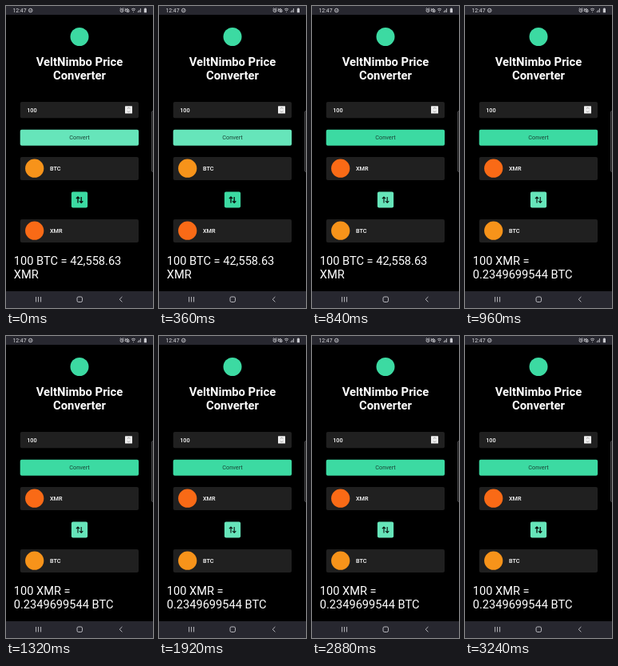
An HTML page that plays this animation: 184 px wide and 378 px high, repeating every 3480 ms.

```html
<!DOCTYPE html>
<html lang="en">
<head>
<meta charset="utf-8">
<title>Price Converter</title>
<style>
  html, body { margin: 0; width: 100%; height: 100%; overflow: hidden; background: #000; }
  svg { display: block; width: 184px; height: 378px; font-family: Roboto, "Open Sans", sans-serif; }
  text { fill: #fff; }
  .bar { fill: #27272f; }
  .field { fill: #202020; }
  .title { font-size: 14.8px; font-weight: 700; text-anchor: middle; }
  .result { font-size: 14.6px; }
  .small { font-size: 7.3px; }
  .coin { font-size: 7.3px; font-weight: 500; }
  .line { fill: none; stroke: #c9c9ce; stroke-width: .9; }
  .btc { fill: #f7931a; }
  .xmr { fill: #f96a16; }

  .before, .after, .old, .new, .convert, .swap, .arrows {
    animation: 3480ms step-end infinite;
  }
  .before { animation-name: swap-out; }
  .after { animation-name: swap-in; }
  .old { animation-name: result-out; }
  .new { animation-name: result-in; }
  .convert { animation-name: release; }
  .swap { animation-name: press; }
  .arrows { animation-name: arrows; fill: none; stroke: #08130f; }

  @keyframes swap-out { 0% { opacity: 1; } 17.24%, 100% { opacity: 0; } }
  @keyframes swap-in { 0% { opacity: 0; } 17.24%, 100% { opacity: 1; } }
  @keyframes result-out { 0% { opacity: 1; } 27.58%, 100% { opacity: 0; } }
  @keyframes result-in { 0% { opacity: 0; } 27.58%, 100% { opacity: 1; } }
  @keyframes release { 0% { fill: #66e5ba; } 17.24%, 100% { fill: #3cdaa2; } }
  @keyframes press { 0% { fill: #3cdaa2; } 17.24%, 100% { fill: #66e5ba; } }
  @keyframes arrows {
    0% { stroke-width: 1.35; }
    17.24% { stroke-width: 1.1; }
    93.1%, 100% { stroke-width: 1.35; }
  }
</style>
</head>
<body>
<svg viewBox="0 0 184 378">
  <defs>
    <g id="btc"><circle class="btc" cx="35.7" cy="14.2" r="11.6"/><text class="coin" x="55" y="17">BTC</text></g>
    <g id="xmr"><circle class="xmr" cx="35.7" cy="14.2" r="11.6"/><text class="coin" x="55" y="17">XMR</text></g>
  </defs>
  <rect width="184" height="378"/>

  <!-- status bar -->
  <rect class="bar" width="184" height="11"/>
  <text x="8.4" y="8" font-size="6.9" style="fill:#d8d8dc">12:47</text>
  <g class="line" style="stroke-width:.9">
    <circle cx="30.7" cy="5.5" r="2.3"/>
    <path d="M29.6 5.4l.9.9 1.6-1.8"/>
    <circle cx="145" cy="5.6" r="2"/>
    <path d="M142.6 3.5l1.2-1M147.4 3.5l-1.2-1M145 4.4v1.3h1M149.3 4.5h1.2l1.6-1.5v5l-1.6-1.5h-1.2zM149 2.8l5 5.2M153.3 4l1 3"/>
    <path d="M157 4.2q2.5-2 5 0M158 5.7q1.5-1.2 3 0M159.5 7.3v.8M165.2 8V6.5M166.8 8V5M168.4 8V3"/>
  </g>
  <path d="M172.8 3.3h.8v-.8h1.6v.8h.8v5h-3.2z" fill="#c9c9ce"/>

  <!-- header -->
  <circle cx="92" cy="38.5" r="11.5" fill="#3cdaa2"/>
  <text class="title" x="92" y="75.1">VeltNimbo Price</text>
  <text class="title" x="92" y="91.9">Converter</text>

  <!-- amount -->
  <rect class="field" x="17.8" y="120" width="148.2" height="20.3" rx="2"/>
  <text class="coin" x="26.2" y="132.6">100</text>
  <rect x="149" y="125.2" width="9" height="9.4" rx=".6" fill="#efefef"/>
  <path d="M151.8 128.7l1.7-1.7 1.7 1.7M151.8 131.3l1.7 1.7 1.7-1.7" fill="none" stroke="#8c8c8c" stroke-width=".8"/>

  <rect class="convert" x="17.7" y="154.7" width="148.4" height="20" rx="2"/>
  <text class="small" x="92" y="166.9" text-anchor="middle" style="fill:#1b4436">Convert</text>

  <!-- currencies -->
  <rect class="field" x="17.8" y="189" width="148.2" height="29" rx="2"/>
  <rect class="field" x="17.8" y="267" width="148.2" height="29" rx="2"/>
  <g class="before"><use href="#btc" y="189"/><use href="#xmr" y="267"/></g>
  <g class="after"><use href="#xmr" y="189"/><use href="#btc" y="267"/></g>

  <rect class="swap" x="81.9" y="232.6" width="20.2" height="20" rx="2"/>
  <path class="arrows" d="M90 246.4v-7.3M87.9 241.1l2.1-2.1 2.1 2.1M94.2 238.9v7.3M92.1 244.2l2.1 2.1 2.1-2.1"/>

  <!-- result -->
  <g class="result">
    <g class="old"><text x="9.8" y="323.8">100 BTC = 42,558.63</text><text x="9.8" y="340.8">XMR</text></g>
    <g class="new"><text x="9.8" y="323.8">100 XMR =</text><text x="9.8" y="340.8">0.2349699544 BTC</text></g>
  </g>

  <!-- edge handle -->
  <rect x="182.5" y="131.5" width="6" height="76" rx="1.5" fill="#1c1c1c" stroke="#48484c"/>

  <!-- navigation bar -->
  <rect class="bar" y="357" width="184" height="21"/>
  <g class="line">
    <path d="M37.6 364v6.5M40.6 364v6.5M43.6 364v6.5"/>
    <rect x="89" y="364" width="6.5" height="6.5" rx="1.8"/>
    <path d="M145.4 364l-3.2 3.2 3.2 3.2"/>
  </g>
</svg>
</body>
</html>
```
